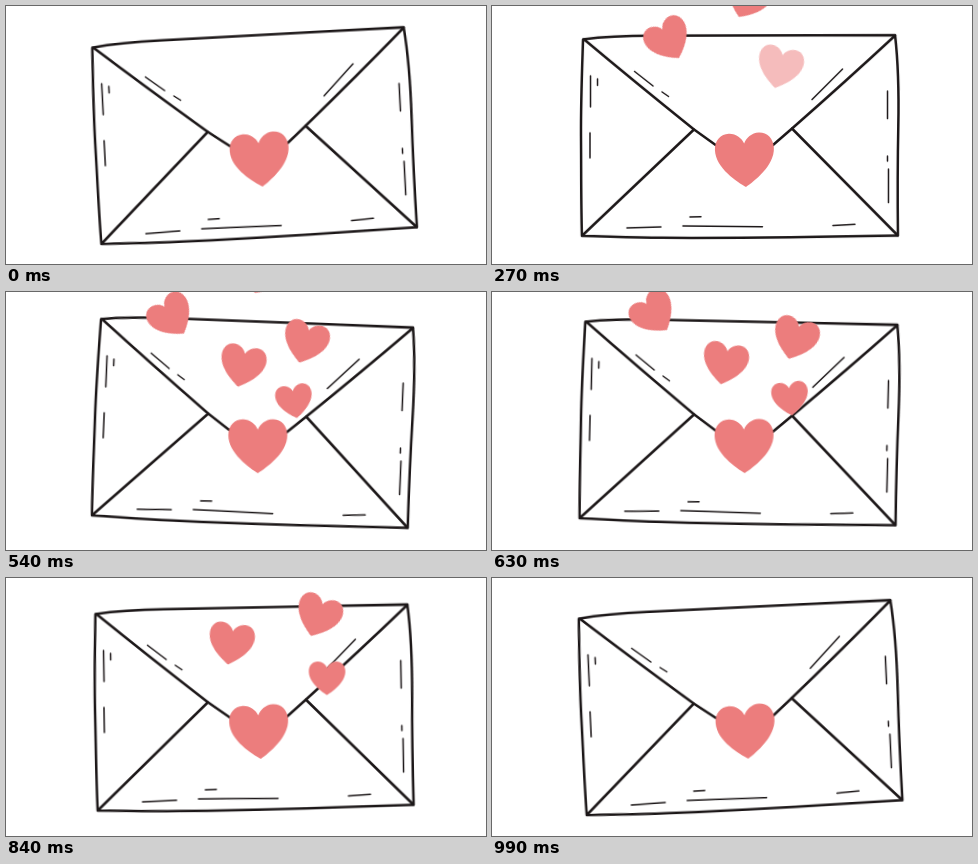
Write an HTML page that moves like this. It is 480 px wide and 258 px high and loops after 1.02 s.

```html
<!DOCTYPE html>
<html lang="en">
<head>
<meta charset="utf-8">
<title>Love letter</title>
<style>
  html, body { margin: 0; width: 100%; height: 100%; overflow: hidden; background: #fff; }
  svg { display: block; width: 100%; height: 100%; }

  .letter {
    transform-origin: 248px 129px;
    animation: swing 1020ms steps(17) infinite;
  }
  .line { fill: none; stroke: #1c1718; stroke-width: 2.5; stroke-linecap: round; stroke-linejoin: round; }
  .tick { stroke-width: 1.5; }
  .heart { fill: #ec7d7d; }

  /* hearts are placed by their tip */
  .fly {
    opacity: 0;
    animation: drift 1020ms steps(34) infinite, var(--fade) 1020ms linear infinite;
  }
  .a { --from: translate(196px, 62.5px) rotate(-24deg);   --to: translate(162px, 22.8px) rotate(-46.6deg);  --fade: fade-a; }
  .b { --from: translate(245px, 21px) rotate(24deg);      --to: translate(252.6px, -16.8px) rotate(24deg);  --fade: fade-b; }
  .c { --from: translate(272.6px, 93.4px) rotate(9.7deg); --to: translate(312px, 50.4px) rotate(22.2deg);   --fade: fade-c; }
  .d { --from: translate(250px, 109.5px) rotate(18.4deg); --to: translate(216px, 81.6px) rotate(6.5deg);    --fade: fade-d; }
  .e { --from: translate(237px, 142px) rotate(-25deg);    --to: translate(339px, 111.6px) rotate(5.6deg);   --fade: fade-e; }

  @keyframes swing {
    0%, 100% { transform: rotate(-2.94deg); }
    50% { transform: rotate(2.7deg); }
  }
  @keyframes drift {
    from { transform: var(--from); }
    to { transform: var(--to); }
  }
  @keyframes fade-a { 0%, 14.7%, 79.4%, 100% { opacity: 0; } 20.6%, 73.5% { opacity: 1; } }
  @keyframes fade-b { 0%, 5.9%, 64.7%, 100%  { opacity: 0; } 11.8%, 58.8% { opacity: 1; } }
  @keyframes fade-c { 0%, 23.5%, 91.2%, 100% { opacity: 0; } 29.4%, 85.3% { opacity: 1; } }
  @keyframes fade-d { 0%, 32.4%, 94.1%, 100% { opacity: 0; } 38.2%, 88.2% { opacity: 1; } }
  @keyframes fade-e { 0%, 41.2%, 97%, 100%   { opacity: 0; } 47.1%, 91.2% { opacity: 1; } }
</style>
</head>
<body>
<svg viewBox="0 0 480 258">
  <defs>
    <path id="heart" d="M0 0C-8-5-29.5-20-29.5-38C-29.5-48-23-54-15-54C-8-54-2-49 0-43.5C2-49 8-54 15-54C23-54 29.5-48 29.5-38C29.5-20 8-5 0 0Z"/>
  </defs>

  <g class="letter">
    <path class="line" d="M91 33.5C110 31 135 29.8 160 29.8C240 30.2 320 30 403 29C406 55 407 85 406.3 120C405.6 155 405.6 195 406 229.5C350 230.5 240 232.5 170 231.8C140 231.5 115 230.5 90 230C89 195 89.3 165 89 130C88.8 95 90 65 91 33.5"/>
    <path class="line" d="M92 33.5Q144 77 202 123.5L225 140M403 29.5Q354 75 300 122.5L281 139"/>
    <path class="line" d="M202 123.5L90.5 229.5M300 122.5L405.5 229"/>
    <path class="line tick" d="M142.5 65.5L161 80M170 86L176.5 90.5M350.5 63L320 93.5
      M98.5 70V101M105.5 73V79.5M98 127V152
      M395.5 85V112.5M395.5 150V155M396.5 163V196.5
      M135 222L169 221M198 211L209 210.7M191 220L270.5 220.7M341 219.5L363 218.3"/>
    <use class="heart" href="#heart" transform="translate(254 181) rotate(-2.4)"/>
  </g>

  <g class="heart">
    <g class="fly a"><use href="#heart" transform="scale(.76)"/></g>
    <g class="fly b"><use href="#heart" transform="scale(.76)"/></g>
    <g class="fly c"><use href="#heart" transform="scale(.77)"/></g>
    <g class="fly d"><use href="#heart" transform="scale(.77)"/></g>
    <g class="fly e"><use href="#heart" transform="scale(.62)"/></g>
  </g>
</svg>
</body>
</html>
```
